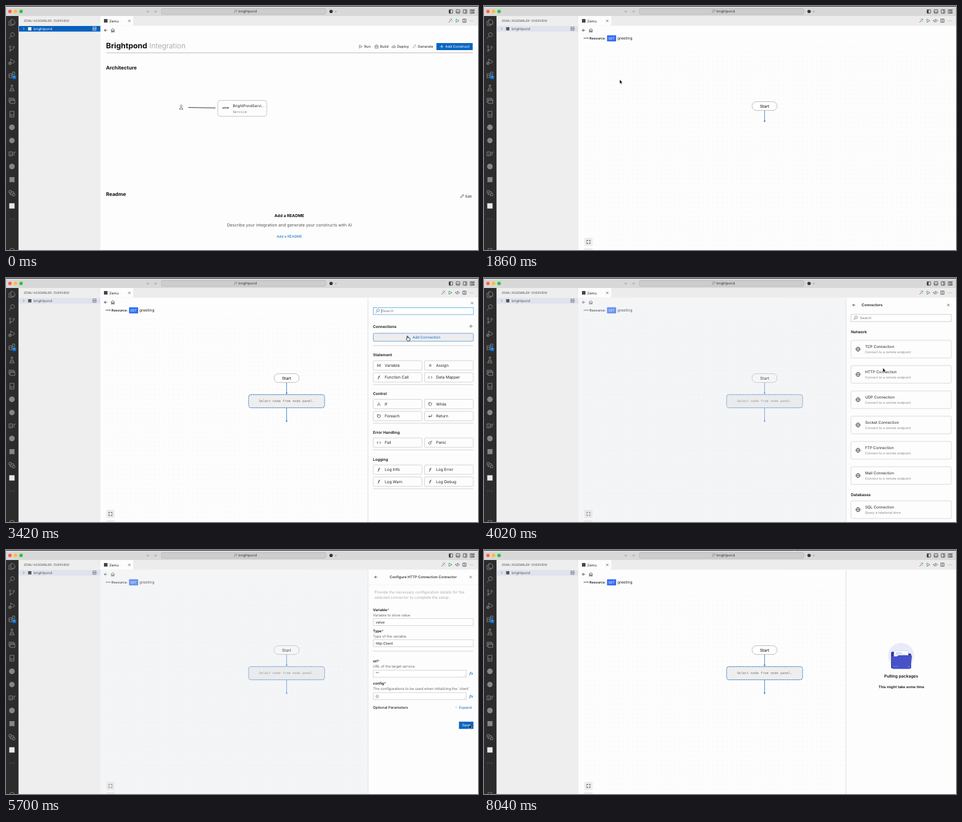
An HTML page for the animation above (8.1 s loop, 800 by 415 pixels).

```html
<!DOCTYPE html>
<html lang="en">
<head>
<meta charset="utf-8">
<title>Low-code editor demo</title>
<style>
html, body { margin: 0; width: 100%; height: 100%; overflow: hidden; background: #fdfdfd; }
svg { display: block; width: 100vw; height: 100vh; }
text { font-family: Inter, "Open Sans", sans-serif; white-space: pre; text-rendering: geometricPrecision; }
text.mono { font-family: "DejaVu Sans Mono", monospace; }
text.serif { font-family: "Noto Serif", serif; font-style: italic; }
</style>
</head>
<body>
<svg id="stage" viewBox="0 0 800 415"></svg>
<script>
const LOOP = 8100;
const BLUE = '#0a66c2', LINK = '#2f7cc4', INK = '#222', GREY = '#858585';

// Drawing helpers; text is placed by its vertical centre.
const text = (x, y, s, size = 6, o = {}) =>
  `<text x="${x}" y="${y + size * 0.36}" font-size="${size}" fill="${o.fill || INK}"
    font-weight="${o.weight || 400}" text-anchor="${o.anchor || 'start'}" class="${o.cls || ''}">${s}</text>`;
const bold = (x, y, s, size, o = {}) => text(x, y, s, size, { weight: 700, fill: '#111', ...o });
const rect = (x, y, w, h, fill, stroke = 'none', rx = 0, extra = '') =>
  `<rect x="${x}" y="${y}" width="${w}" height="${h}" fill="${fill}" stroke="${stroke}" stroke-width=".8" rx="${rx}" ${extra}/>`;
const circle = (x, y, r, fill, stroke = 'none') =>
  `<circle cx="${x}" cy="${y}" r="${r}" fill="${fill}" stroke="${stroke}" stroke-width=".9"/>`;
const line = (x1, y1, x2, y2, stroke = '#c8c8c8', w = 0.8) =>
  `<path d="M${x1} ${y1}L${x2} ${y2}" stroke="${stroke}" stroke-width="${w}"/>`;
const group = (id, body) => `<g id="${id}">${body}</g>`;

const ICONS = {
  files: 'M-2-5H2L5-2V3H-2ZM-2-2H-5V5H2V3',
  search: 'M1-5A3.4 3.4 0 1 1 .9-5M-1.5 1L-5 5',
  branch: 'M-3-2V2M3-1Q3 2-3 2M-3-5A1.4 1.4 0 1 1-3.1-5M3-4A1.4 1.4 0 1 1 2.9-4M-3 2A1.4 1.4 0 1 1-3.1 2',
  debug: 'M-2-1V-5L5 0L1 3M-3 0A2.2 2.5 0 1 1-3.1 0M-6 2H0M-5 5L-1 0',
  blocks: 'M-5-2H0V5H-5ZM-5 1.5H5V5H0M5 1.5V5M1-5H5V-1H1Z',
  flask: 'M-2-5H2M-1-5V-1L-4 5H4L1-1V-5M-3 2H3',
  windows: 'M-3-3H5V4H-3ZM-3-1H5M-3 2H-5V-5H3V-3',
  server: 'M-3.5-5H3.5V5H-3.5ZM-3.5 1H3.5M-2 3H0',
  flow: 'M-5-3H1V4H-5ZM1-1H5V-4M1 2H5M-3-1L-1 1L-3 3',
  nodes: 'M-5-4H-1V0H-5ZM1 1H5V5H1ZM-3 0V3H1M-1-2H3V1',
  left: 'M3 0H-3L0-3M-3 0L0 3',
  right: 'M-3 0H3L0-3M3 0L0 3',
  home: 'M-4 0L0-4L4 0M-3-1V4H-1V1H1V4H3V-1',
  close: 'M-3-3L3 3M3-3L-3 3',
  wand: 'M-4 4L2-2M2-5V-3M4-1H5M-2-4L-1-3M4-4L3-3M3 2L4 3',
  play: 'M-3-4L4 0L-3 4Z',
  code: 'M-2-3L-5 0L-2 3M2-3L5 0L2 3M1-4L-1 4',
  split: 'M-4-4H4V4H-4ZM0-4V4',
  dots: 'M-4 0H-3M-.5 0H.5M3 0H4',
  pencil: 'M-4 4L-3 1L3-5L5-3L-1 3ZM1-3L3-1',
  box: 'M-4-2L-2-4H2L4-2V4H-4ZM-4-1H4M-1 1H1',
  cloud: 'M-2 3H-4Q-6 0-3-1Q-1-5 2-2Q6-2 4 3H2M0 4V0M-2 2L0 0L2 2',
  plus: 'M0-4V4M-4 0H4',
  globe: 'M0-4A4 4 0 1 1-.1-4M-4 0H4M0-4Q-4 0 0 4Q4 0 0-4',
  exportTo: 'M-5-3V3M-4 0H5L2-2M5 0L2 2',
  person: 'M0-5A2.3 2.3 0 1 1-.1-5M-4 5Q-4 1 0 1Q4 1 4 5Z',
  chevron: 'M-1.5-3L1.5 0L-1.5 3',
  down: 'M-3-1.5L0 1.5L3-1.5',
  fit: 'M-4-1V-4H-1M1-4H4V-1M4 1V4H1M-1 4H-4V1',
  equals: 'M-3-1.5H3M-3 1.5H3',
  angles: 'M-2-3L-5 0L-2 3M2-3L5 0L2 3',
  fork: 'M0-4V0L-3 3M0 0L3 3M-4 3H-2M2 3H4',
  loop: 'M-3-3A4 4 0 1 0 1-4M-4-4H-1V-1',
  back: 'M4-4V1H-4L-1-2M-4 1L-1 4',
  bomb: 'M-1-2A3 3 0 1 1-1.1-2M1-1L3-4L5-3',
  vars: 'M-3-4Q-5 0-3 4M3-4Q5 0 3 4M-1.5-2L1.5 2M1.5-2L-1.5 2',
  fn: 'M3-4Q0-5 0-1L-1 3Q-1 5-3 4M-2-1H2'
};
const icon = (name, x, y, color = INK, scale = 0.75, w = 1) =>
  `<path d="${ICONS[name]}" transform="translate(${x} ${y}) scale(${scale})" fill="none"
    stroke="${color}" stroke-width="${w}" stroke-linejoin="round"/>`;

const TOOL = '#4a4a4a';
const toolIcons = list => list.map((n, i) =>
  icon(n, 789 - 12 * (list.length - 1 - i), 25, n === 'play' ? '#2f9a45' : TOOL, 0.7, 1.2)).join('');

function treeRow(fill, ink) {
  const thin = 'style="stroke-width:.5"';
  return rect(22, 34, 138, 9.5, fill) + icon('chevron', 30, 38.7, ink, 0.65) +
    rect(37.5, 36, 5.5, 5.5, ink) + text(47, 38.7, 'brightpond', 6, { fill: ink }) +
    rect(147.2, 35.5, 5.6, 1.8, 'none', ink, 0, thin) + rect(147.2, 40, 5.6, 1.8, 'none', ink, 0, thin) +
    line(145.8, 38.7, 154.2, 38.7, ink, 0.6);
}

function chrome() {
  let s = rect(0, 0, 800, 17, '#d8d8d8') + rect(0, 0, 800, 1, '#222');
  ['#ff5f57', '#febc2e', '#28c840'].forEach((c, i) => s += circle(6.7 + 9.4 * i, 9.3, 3, c));
  s += icon('left', 241, 9.3, '#a2a2a2', 0.8) + icon('right', 253, 9.3, '#a2a2a2', 0.8) +
    rect(263.5, 4.3, 278.5, 9.7, '#cdcdcd', '#b5b5b5', 2.5) + icon('search', 389, 9, '#555', 0.55) +
    text(394, 9, 'brightpond', 6, { fill: '#333' }) + circle(551, 9.3, 2.8, '#333') + icon('down', 559, 9.5, '#444', 0.55);
  [754, 766, 778].forEach((x, i) => s += rect(x - 3, 6.3, 6, 6, 'none', '#333', 0.6) +
    [rect(x - 3, 6.3, 2.5, 6, '#333'), line(x - 3, 10.3, x + 3, 10.3, '#333'), line(x + 1, 6.3, x + 1, 12.3, '#333')][i]);
  s += rect(787, 6.3, 2.4, 6, 'none', '#333') + rect(791, 6.3, 2.4, 2, 'none', '#333') + rect(791, 10.3, 2.4, 2, 'none', '#333');

  s += rect(0, 17, 21.5, 398, '#2c2c2c');
  ['files', 'search', 'branch', 'debug', 'blocks', 'flask', 'windows', 'server', '', '', 'flow', '', '', 'nodes']
    .forEach((n, i) => { if (n) s += icon(n, 10, 28 + 22.3 * i, GREY, 0.98); });
  s += circle(10, 206.3, 4.8, GREY) + circle(10, 228.8, 4.6, GREY) + circle(10, 273, 4.8, GREY) +
    rect(5.8, 291, 8.6, 8.6, GREY) + rect(5.5, 335.5, 9, 9, '#e8e8e8') +
    icon('dots', 10, 362.3, GREY, 1) + circle(10, 416, 4, 'none', GREY) +
    circle(13.8, 121, 3.6, '#0a70c9') + text(13.8, 121, '3', 4, { fill: '#fff', anchor: 'middle' });

  s += rect(21.5, 17, 138.5, 398, '#eeeeee') + text(30, 25.3, 'ZEMU ASSEMBLER: OVERVIEW', 5.2, { fill: '#555' }) +
    rect(160, 17, 640, 16.5, '#ececec') + rect(160, 17, 55.5, 16.5, '#fdfdfd') +
    rect(166, 22.2, 6, 6, '#444') + text(175, 25.4, 'Zemu', 6) + icon('close', 209, 25.3, '#333', 0.65) +
    icon('left', 169, 41.3, INK, 0.8) + icon('home', 181, 41.3, INK, 0.75);
  return s;
}

function overview() {
  const action = (n, x, s) => icon(n, x - 6, 69, '#444', 0.65) + text(x, 69, s, 6);
  return treeRow('#075fbd', '#fff') + toolIcons(['wand', 'play', 'split', 'dots']) +
    bold(169.5, 67.5, 'Brightpond', 12.8) + text(243, 67.5, 'Integration', 12.4, { fill: '#999', weight: 300 }) +
    action('play', 607, 'Run') + action('box', 634, 'Build') + action('cloud', 663, 'Deploy') + action('wand', 698, 'Generate') +
    rect(729.5, 63, 61.5, 12, BLUE) + icon('plus', 738.5, 69, '#fff', 0.7) + text(744.5, 69, 'Add Construct', 6, { fill: '#fff' }) +
    line(170, 79.7, 791, 79.7, '#aaa') + bold(169.5, 105, 'Architecture', 8.5) +
    icon('person', 297, 172, '#555', 0.75) + line(309, 172.6, 355, 173.4, '#333', 1) +
    rect(359, 160.5, 83, 27, '#fdfdfd', '#b8b8b8', 4) + bold(372.5, 174, 'HTTP', 4, { anchor: 'middle' }) +
    text(384.5, 169.7, 'BrightPondServi…', 6.3) + text(384.5, 179.5, 'Service', 5.6, { cls: 'mono', fill: '#777' }) +
    bold(169.5, 320, 'Readme', 8.5) + icon('pencil', 773, 323.5, '#444', 0.65) + text(778.5, 323.5, 'Edit', 6) +
    bold(480.3, 356.3, 'Add a README', 6.9, { anchor: 'middle' }) +
    text(480.3, 372.3, 'Describe your integration and generate your constructs with AI', 7.15, { anchor: 'middle', fill: '#555' }) +
    text(480.3, 391.7, 'Add a README', 6, { anchor: 'middle', fill: BLUE });
}

function service() {
  return icon('globe', 173.3, 60.4, '#111', 0.75, 1.2) + bold(178.5, 60.4, 'Service /hello', 6.8) +
    icon('pencil', 232.5, 60.4, '#444', 0.65) + text(237, 60.4, 'Edit', 6, { fill: '#555' }) +
    text(171.5, 74.8, 'Listening on: 9090', 5.9) +
    rect(688.5, 54, 47, 12.5, BLUE) + icon('plus', 697.5, 60.3, '#fff', 0.75) + text(702.5, 60.3, 'Resource', 6.2, { fill: '#fff' }) +
    rect(738, 54, 53, 12.5, '#565a66') + icon('exportTo', 747, 60.3, '#fff', 0.65) + text(752, 60.3, 'Export OAS', 6, { fill: '#fff' }) +
    bold(169.5, 103, 'Available resources', 6.85) +
    rect(169.5, 116.5, 621.5, 20.5, '#efefef') + rect(174, 121, 33, 11.5, '#3470f2') +
    bold(190.5, 126.7, 'get', 6.2, { anchor: 'middle', fill: '#fff' }) + text(213, 126.7, 'greeting', 6.1) +
    [-2, 0, 2].map(d => circle(783.3, 126.7 + d, 0.6, '#333')).join('');
}

const arrow = (y1, y2, c) => line(475.6, y1, 475.6, y2 - 2, c, 0.9) +
  `<path d="M474 ${y2 - 3}h3.2l-1.6 3z" fill="${c}"/>`;

function diagram() {
  return rect(168, 66, 632, 349, 'url(#dots)') +
    bold(169.3, 54.8, 'HTTP', 3) + text(178.8, 55, 'Resource:', 5.7, { weight: 600 }) +
    rect(208.5, 49.7, 15.5, 10.5, '#3470f2', 'none', 0.8) + text(216.2, 55, 'GET', 5.4, { fill: '#fff', anchor: 'middle' }) +
    text(226, 55, 'greeting', 6.5) +
    rect(454.3, 162.7, 42.5, 15, '#fff', '#aaa', 7.5) + text(475.5, 170.2, 'Start', 6.8, { anchor: 'middle', weight: 500 }) +
    group('link', arrow(178, 198, LINK)) + group('linkHot', arrow(178, 198, '#e59a72')) +
    group('slot', rect(411.2, 198.4, 128.8, 22.2, '#eeeeee', LINK, 4, 'style="stroke-width:1.1" stroke-dasharray="2 1"') +
      text(475.5, 209.3, 'Select node from node panel.', 5.55, { cls: 'mono', anchor: 'middle', fill: '#777' }) +
      arrow(221, 245.5, LINK)) +
    rect(170, 394, 14, 14, '#ececec') + icon('fit', 177, 401.3, '#333', 0.68, 1.2) + rect(170, 412, 14, 3, '#ececec');
}

const panelBack = rect(612.5, 34, 1.5, 381, '#efefef') + rect(614, 33.5, 186, 381.5, '#fdfdfd') + line(614, 34, 614, 415, '#e6e6e6', 0.7);
const field = (y, s, w = 170) => rect(622.4, y - 5.8, w - 0.4, 11.8, '#fff', '#cecece') + text(626.5, y, s, 6);
const button = (x, y, ico, s) => rect(x + 0.4, y - 8, 82.6, 16, '#fdfdfd', '#c8c8c8', 1.6) +
  icon(ico, x + 10, y, INK, 0.65, 1.15) + text(x + 20, y, s, 6.6);

function palette() {
  const sections = [
    [131, 'Statement', 'vars:Variable equals:Assign fn:Function_Call angles:Data_Mapper'],
    [196.7, 'Control', 'fork:If loop:While loop:Foreach back:Return'],
    [262.3, 'Error Handling', 'angles:Fail bomb:Panic'],
    [308.3, 'Logging', 'fn:Log_Info fn:Log_Error fn:Log_Warn fn:Log_Debug']
  ];
  let s = panelBack + icon('close', 790, 42.6, '#333', 0.65) +
    rect(622.5, 50.5, 169.7, 11.6, '#fff', '#4aa3df') + icon('search', 630, 56, '#444', 0.65) + line(636.5, 52.8, 636.5, 59.5, '#222', 0.6) +
    text(637, 56.2, 'Search', 6, { fill: '#777' }) + bold(622, 82.3, 'Connections', 6.5, { weight: 600 }) +
    icon('plus', 788, 82, '#555', 0.75) + rect(622.5, 94, 169.7, 13.6, '#ededee', '#4f93d2', 1.6) +
    icon('plus', 681.5, 101, BLUE, 0.6) + text(689, 101, 'Add Connection', 6.2, { fill: BLUE }) + line(622, 115, 792, 115);
  for (const [y, title, items] of sections) {
    s += bold(622, y, title, 6.5, { weight: 600 });
    const list = items.split(' ');
    list.forEach((item, i) => {
      const [ico, label] = item.split(':');
      s += button(622 + 87 * (i % 2), y + 17.7 + 20.4 * (i >> 1), ico, label.replace('_', ' '));
    });
    const end = y + 30 + 20.3 * (list.length / 2 - 1);
    s += line(622, end, 792, end);
  }
  return s;
}

function connectors() {
  let s = panelBack + icon('left', 627, 46, INK, 0.75) + text(640, 46, 'Connectors', 6.3, { weight: 600 }) +
    icon('close', 787, 46, '#333', 0.65) + rect(622, 62, 170, 12, '#fff', '#c4c4c4') +
    icon('search', 630, 68, '#444', 0.65) + text(637, 68, 'Search', 6, { fill: '#777' });
  const card = (y, name, note) => rect(622, y - 15, 170, 30, '#fdfdfd', '#d0d0d0', 2) + icon('globe', 634, y, '#555', 0.9) +
    text(646, y - 4, name, 6.4) + text(646, y + 5, note, 5.5, { fill: '#888' });
  s += bold(622, 92, 'Network', 6.5, { weight: 600 });
  ['TCP Connection', 'HTTP Connection', 'UDP Connection', 'Socket Connection', 'FTP Connection', 'Mail Connection']
    .forEach((n, i) => s += card(121 + 43 * i, n, 'Connect to a remote endpoint'));
  return s + bold(622, 369, 'Databases', 6.5, { weight: 600 }) + card(394, 'SQL Connection', 'Query a relational store');
}

function form() {
  const label = (y, name, note) => bold(622, y, name + '<tspan fill="#c33">*</tspan>', 6.1, { weight: 600 }) +
    text(622, y + 9, note, 6, { fill: '#666' });
  const area = (y, s) => field(y, s, 158) + line(776, y + 5, 779, y + 2, '#888', 0.5) +
    text(785.5, y, 'fx', 6, { cls: 'serif', fill: BLUE, weight: 600 });
  return panelBack + icon('left', 627, 46, INK, 0.75) +
    text(707, 46.3, 'Configure HTTP Connection Connector', 6.05, { anchor: 'middle', weight: 500 }) +
    icon('close', 787.5, 46, '#333', 0.65) + line(614, 59, 800, 59, '#f2f2f2') +
    text(624.5, 72, 'Provide the necessary configuration details for the', 6.4, { fill: '#aaa' }) +
    text(624.5, 80.3, 'selected connector to complete the setup.', 6.4, { fill: '#aaa' }) +
    label(102.3, 'Variable', 'Variable to store value') + field(122.5, 'value') +
    label(138.3, 'Type', 'Type of the variable') + field(158.5, 'http:Client') + line(622, 172, 792, 172) +
    label(188.5, 'url', 'URL of the target service') + area(210.3, '""') +
    label(226.7, 'config', 'The configurations to be used when initializing the `client`') + area(248.5, '{}') +
    text(622, 267.6, 'Optional Parameters', 6.1, { weight: 500 }) + icon('down', 763, 267.6, BLUE, 0.5) +
    text(768, 267.6, 'Expand', 6, { fill: BLUE }) +
    rect(767.7, 292, 24.6, 12.3, BLUE) + text(780, 298.2, 'Save', 6.1, { fill: '#fff', anchor: 'middle' });
}

function pulling() {
  return panelBack + circle(707, 180, 22, '#e9ebfa') +
    '<path d="M690 201V175q0-2 2-2h8l3 3h19q2 0 2 2v23z" fill="#2f3a9e"/>' +
    rect(695, 171.5, 24, 22, '#fff', '#c9cdea', 0.6) + line(698, 175, 708, 175, '#7c84cf') + line(698, 177.5, 715, 177.5, '#b5baea') +
    '<path d="M690.5 181h9l3-2h21.5q1.4 0 1.2 1.6l-2 20q-.2 1.6-2 1.6h-27.5q-2 0-2.2-2z" fill="#4652c6"/>' +
    line(694, 198, 703, 198, '#7c86e2') + circle(720, 198.5, 2, '#5f6ad6') +
    bold(707, 214, 'Pulling packages', 7, { anchor: 'middle', weight: 600 }) +
    bold(707.3, 232.3, 'This might take some time', 6.15, { anchor: 'middle', weight: 600 });
}

const pointers =
  group('arrow', '<path d="M0 0V7.2L1.6 5.8L2.7 8.3L3.8 7.8L2.7 5.4H4.9Z" fill="#000" stroke="#fff" stroke-width=".5"/>') +
  group('move', '<path d="M-3.5 0H3.5M0-3.5V3.5" stroke="#fff" stroke-width="2.6"/><path d="M-3 0H3M0-3V3" stroke="#000" stroke-width="1.4"/>') +
  group('hand', '<path d="M-1.5-3q1-1 1.4 0v2.5l3.2.8q1 .4.8 1.7l-.6 3H-.4L-3 1.8q.2-1 1.5-.2z" fill="#fff" stroke="#000" stroke-width=".7"/>');

document.getElementById('stage').innerHTML =
  `<defs><pattern id="dots" x="168" y="66" width="8" height="8" patternUnits="userSpaceOnUse">
    <circle cx="4" cy="4" r=".5" fill="#e2e2e2"/></pattern></defs>` +
  rect(0, 0, 800, 415, '#fdfdfd') + chrome() + group('overview', overview()) +
  group('editor', treeRow('#dfe3ee', '#555') + toolIcons(['wand', 'play', 'code', 'split', 'dots'])) +
  group('service', service()) + group('diagram', diagram()) +
  group('shade', rect(160, 33.5, 640, 381.5, '#dfe3e8')) +
  group('palette', palette()) + group('connectors', connectors()) + group('form', form()) + group('pulling', pulling()) +
  group('cursor', pointers);

const el = {};
document.querySelectorAll('g[id]').forEach(g => el[g.id] = g);
const clamp = v => Math.max(0, Math.min(1, v));
const ramp = (t, a, b) => clamp((t - a) / (b - a));
const smooth = p => p * p * (3 - 2 * p);
const easeOut = p => 1 - (1 - p) ** 3;
const show = (id, on) => el[id].setAttribute('display', on ? 'inline' : 'none');
const fade = (id, v) => { show(id, v > 0); el[id].setAttribute('opacity', v); };
const shift = (id, x, y = 0) => el[id].setAttribute('transform', `translate(${x} ${y})`);

// Scene changes, in ms.
const CUT = { service: 780, diagram: 1860, slot: 2700, list: 3600, form: 4200, pull: 6240 };
const PATH = [
  [120, 150, 60], [700, 400, 174], [960, 400, 174], [1200, 369, 168], [1620, 230, 125], [1980, 230, 125],
  [2400, 475, 186], [2800, 475, 186], [3300, 681, 102], [3700, 681, 102], [4140, 675, 164], [4560, 675, 164],
  [5460, 785, 297], [6780, 785, 297], [6840, 738, 222], [7740, 575, 38], [8040, 523, -8], [8100, 520, -12]
];

function cursorAt(t) {
  const i = Math.max(1, PATH.findIndex(k => k[0] >= t));
  const [a, x1, y1] = PATH[i - 1], [b, x2, y2] = PATH[i];
  const p = smooth(ramp(t, a, b));
  return [x1 + (x2 - x1) * p, y1 + (y2 - y1) * p];
}

function render(t) {
  show('overview', t < CUT.service);
  show('editor', t >= CUT.service);
  show('service', t >= CUT.service && t < CUT.diagram);
  show('diagram', t >= CUT.diagram);
  show('slot', t >= CUT.slot);
  const hot = t >= 2400 && t < 2820;
  show('link', !hot);
  show('linkHot', hot);

  const open = ramp(t, 2655, 2960);
  fade('palette', t < CUT.slot || t >= CUT.list + 120 ? 0 : open);
  shift('palette', 186 * (1 - smooth(open)));
  fade('connectors', Math.min(ramp(t, CUT.list, CUT.list + 120), 1 - ramp(t, 4200, 4440)));
  const slide = ramp(t, CUT.form, 4555);
  fade('form', t < CUT.pull ? ramp(t, CUT.form, 4440) : 0);
  shift('form', 186 * (1 - easeOut(slide)));
  fade('shade', t < CUT.pull ? 0.32 * ramp(t, CUT.list, CUT.list + 180) : 0);
  fade('pulling', ramp(t, CUT.pull - 60, CUT.pull));

  const kind = hot ? 'move' : (t >= 3240 && t < 3720) || (t >= 640 && t < CUT.service) ? 'hand' : 'arrow';
  ['arrow', 'move', 'hand'].forEach(k => show(k, k === kind));
  show('cursor', t >= 120);
  shift('cursor', ...cursorAt(t));
}

const start = performance.now();
function tick() {
  render((performance.now() - start) % LOOP);
  requestAnimationFrame(tick);
}
render(0);
requestAnimationFrame(tick);
</script>
</body>
</html>
```
